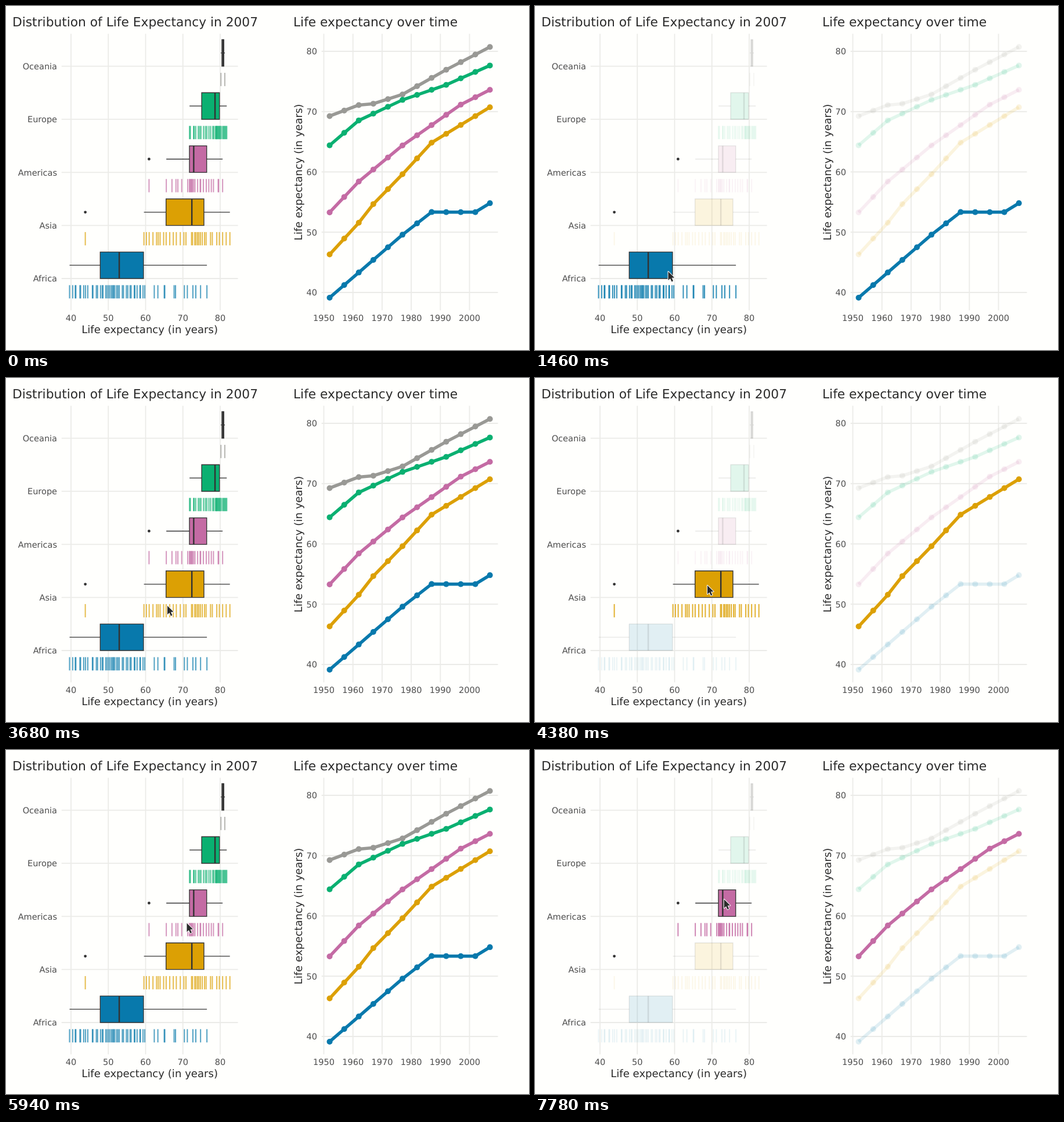
Recreate the animation shown at these times as an HTML page with a canvas. Size 901x592 px, loop 8 s.

```html
<!DOCTYPE html>
<html lang="en">
<head>
<meta charset="utf-8">
<title>Life expectancy</title>
<style>
  html, body { margin: 0; width: 100%; height: 100%; overflow: hidden; background: #fffffd; }
  canvas { display: block; }
</style>
</head>
<body>
<canvas id="stage" width="901" height="592"></canvas>
<script>
const ctx = document.getElementById('stage').getContext('2d');
const LOOP = 8000, DIM = 0.12, INK = '#333333', GRID = '#ebebe8', PAPER = '#fffffd';
const TOP = 47.7, BOTTOM = 523.8, ROW = 91.35, STROKE = 1.35;

// spread: five-number summary in 2007; trend: [five-year step since 1952, mean] turning points
const continents = [
  { name: 'Oceania', color: '#999995', count: 2, spread: [80.2, 80.46, 80.72, 80.98, 81.24],
    trend: [[0, 69.26], [2, 71.09], [3, 71.31], [5, 72.85], [8, 76.95], [11, 80.72]] },
  { name: 'Europe', color: '#0ab071', count: 30, spread: [71.78, 75.03, 78.61, 79.81, 81.76],
    trend: [[0, 64.41], [2, 68.54], [5, 71.94], [8, 74.44], [11, 77.65]] },
  { name: 'Americas', color: '#c46ba4', count: 24, spread: [65.55, 71.75, 72.9, 76.38, 80.65], outlier: 60.92,
    trend: [[0, 53.28], [2, 58.4], [5, 64.39], [9, 71.15], [11, 73.61]] },
  { name: 'Asia', color: '#dca004', count: 32, spread: [59.55, 65.48, 72.4, 75.64, 82.6], outlier: 43.83,
    trend: [[0, 46.31], [2, 51.56], [3, 54.66], [5, 59.61], [7, 64.85], [11, 70.73]] },
  { name: 'Africa', color: '#0879ac', count: 52, spread: [39.61, 47.83, 52.93, 59.44, 76.44],
    trend: [[0, 39.14], [5, 49.58], [7, 53.34], [10, 53.33], [11, 54.81]] }
];

// [time, highlighted continent]
const focusSteps = [[0, ''], [620, 'Africa'], [940, ''], [1160, 'Africa'], [3160, ''], [3320, 'Asia'],
  [3540, ''], [3820, 'Asia'], [5780, ''], [6080, 'Americas']];

// [start, end, x, y]: the pointer speeds up towards each stop, or jumps when start equals end
const moves = [[500, 500, 211, 528], [500, 1020, 229, 484], [1460, 1460, 229.5, 457], [3240, 3680, 278, 392],
  [4100, 4100, 294, 357.5], [4380, 4380, 297, 357], [5780, 5940, 311.5, 298],
  [6080, 6080, 322, 274], [6360, 6360, 316, 266], [7780, 7780, 325.7, 257]];

const ageX = v => 112 + (v - 40) * 6.425;
const ageY = v => 493 - (v - 40) * 10.375;
const yearX = y => 547.5 + (y - 1950) * 5.02;
const rowY = i => 103.6 + i * ROW;

function interpolate(knots, x) {
  const end = Math.max(1, knots.findIndex(k => k[0] >= x));
  const [[x1, y1], [x2, y2]] = [knots[end - 1], knots[end]];
  return y1 + (y2 - y1) * (x - x1) / (x2 - x1);
}

let seed = 7;
function random() {
  seed = (seed * 16807) % 2147483647;
  return seed / 2147483647;
}

for (const c of continents) {
  const quartiles = c.spread.map((v, i) => [i / 4, v]);
  const last = c.count - 1;
  c.ages = Array.from({ length: c.count }, (_, i) => {
    const wobble = i % last ? random() - 0.5 : 0;
    return interpolate(quartiles, (i + wobble) / last);
  });
  if (c.outlier) c.ages.push(c.outlier);
  c.points = Array.from({ length: 12 }, (_, i) => [yearX(1952 + i * 5), ageY(interpolate(c.trend, i))]);
}

function line(x1, y1, x2, y2, color, width) {
  ctx.strokeStyle = color;
  ctx.lineWidth = width;
  ctx.beginPath();
  ctx.moveTo(x1, y1);
  ctx.lineTo(x2, y2);
  ctx.stroke();
}

function dot(x, y, r, color) {
  ctx.fillStyle = color;
  ctx.beginPath();
  ctx.arc(x, y, r, 0, Math.PI * 2);
  ctx.fill();
}

function label(text, x, y, size, align = 'left', color = '#2b2b2b') {
  ctx.font = `${size}px "DejaVu Sans", sans-serif`;
  ctx.textRendering = 'geometricPrecision';
  ctx.textAlign = align;
  ctx.fillStyle = color;
  ctx.fillText(text, x, y);
}

const tick = (text, x, y, align) => label(text, x, y, 14.5, align, '#4d4d4d');

function drawAxes() {
  continents.forEach((c, i) => {
    line(95.7, rowY(i), 399.6, rowY(i), GRID, 1.8);
    tick(c.name, 88, rowY(i) + 5.3, 'right');
  });
  for (let v = 40; v <= 80; v += 10) {
    line(ageX(v), TOP, ageX(v), BOTTOM, GRID, 1.8);
    tick(v, ageX(v), 542.3, 'center');
    line(543.7, ageY(v), 847.5, ageY(v), GRID, 1.8);
    tick(v, 536, ageY(v) + 5.3, 'right');
  }
  for (let y = 1950; y <= 2000; y += 10) {
    line(yearX(y), TOP, yearX(y), BOTTOM, GRID, 1.8);
    tick(y, yearX(y), 542.3, 'center');
  }
  label('Distribution of Life Expectancy in 2007', 11, 35, 21.75);
  label('Life expectancy over time', 495, 35, 21.75);
  label('Life expectancy (in years)', 247.6, 563, 18.12, 'center');
  ctx.save();
  ctx.translate(510, 286);
  ctx.rotate(-Math.PI / 2);
  label('Life expectancy (in years)', 0, 0, 18.12, 'center');
  ctx.restore();
}

function drawBox(c, y, alpha) {
  const [low, q1, mid, q3, high] = c.spread.map(ageX);
  const top = y - ROW / 2, middle = y - ROW / 4;
  if (c.outlier) dot(ageX(c.outlier), middle, 2.4, INK);
  ctx.globalAlpha = alpha;
  line(low, middle, q1, middle, INK, STROKE);
  line(q3, middle, high, middle, INK, STROKE);
  ctx.fillStyle = c.color;
  ctx.beginPath();
  ctx.rect(q1, top, q3 - q1, ROW / 2);
  ctx.fill();
  ctx.stroke();
  line(mid, top, mid, y, INK, STROKE * 1.8);
  ctx.globalAlpha = 1;
}

function drawRug(c, y, alpha) {
  ctx.globalAlpha = alpha;
  for (const v of c.ages) line(ageX(v), y + ROW / 8, ageX(v), y + ROW * 3 / 8, c.color, 2);
  ctx.globalAlpha = 1;
}

function drawTrend(c, alpha) {
  ctx.globalAlpha = alpha;
  ctx.strokeStyle = c.color;
  ctx.lineWidth = 5.5;
  ctx.beginPath();
  c.points.forEach(p => ctx.lineTo(...p));
  ctx.stroke();
  c.points.forEach(p => dot(...p, 5, c.color));
  ctx.globalAlpha = 1;
}

function drawArrow(x, y) {
  const outline = [[0, 0], [0, 15], [3.5, 12], [6, 17.4], [8.5, 16.2], [6, 10.8], [10.6, 10.6]];
  ctx.beginPath();
  outline.forEach(([dx, dy]) => ctx.lineTo(x + dx, y + dy));
  ctx.closePath();
  ctx.strokeStyle = '#ffffff';
  ctx.lineWidth = 2;
  ctx.stroke();
  ctx.fillStyle = '#2b2b2b';
  ctx.fill();
}

function drawBeam(x, y) {
  for (const [color, width] of [['#ffffff', 3], [INK, 1.3]]) {
    line(x, y - 6.5, x, y + 6.5, color, width);
    line(x - 3, y - 7, x + 3, y - 7, color, width);
    line(x - 3, y + 7, x + 3, y + 7, color, width);
  }
}

function pointerAt(t) {
  let x = 0, y = 0;
  for (const [start, end, toX, toY] of moves) {
    if (t < start) break;
    const p = t >= end ? 1 : ((t - start) / (end - start)) ** 2;
    x += (toX - x) * p;
    y += (toY - y) * p;
  }
  return [x, y];
}

function render(t) {
  const focus = focusSteps.filter(s => s[0] <= t).pop()[1];
  ctx.fillStyle = PAPER;
  ctx.fillRect(0, 0, 901, 592);
  ctx.lineJoin = 'miter';
  drawAxes();
  continents.forEach((c, i) => {
    const alpha = focus && focus !== c.name ? DIM : 1;
    drawBox(c, rowY(i), alpha);
    drawRug(c, rowY(i), alpha * (focus === c.name ? 0.82 : 0.7));
  });
  ctx.lineJoin = 'round';
  continents.forEach(c => drawTrend(c, focus && focus !== c.name ? DIM : 1));
  if (t < moves[0][0]) return;
  const [x, y] = pointerAt(t);
  (y > BOTTOM - 20 ? drawBeam : drawArrow)(x, y);
}

const start = performance.now();
function frame() {
  render((performance.now() - start) % LOOP);
  requestAnimationFrame(frame);
}
frame();
</script>
</body>
</html>
```
